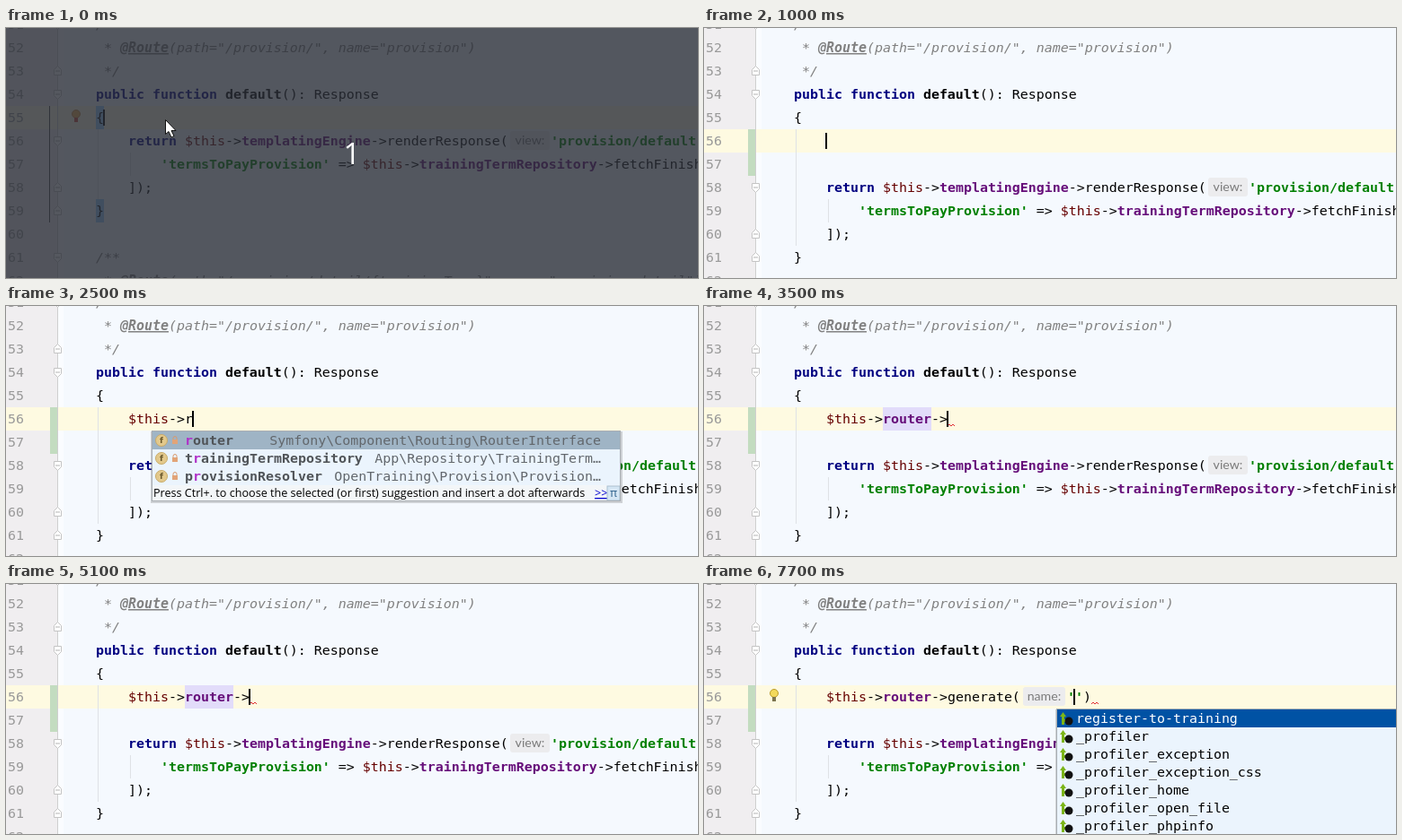
An HTML page for the animation above (8000 ms loop, 770 px wide and 279 px high).

```html
<!DOCTYPE html>
<html lang="en">
<head>
<meta charset="utf-8">
<title>Code completion</title>
<style>
html, body { margin: 0; width: 100%; height: 100%; overflow: hidden; background: #f5f9fe; }
svg { display: block; }
text { font: 14.95px "DejaVu Sans Mono", monospace; white-space: pre; }
.c, .a { fill: #808080; font-style: italic; }
.a, .k, .m, .f, .s, .b { font-weight: bold; }
.a { text-decoration: underline; }
.k { fill: #000080; }
.f { fill: #660e7a; }
.s { fill: #008000; }
.v { fill: #660000; }
.num { fill: #999; }
.b, .n { fill: #505458; }
.type { fill: #62676c; }
.hit { fill: #b030c8; }
.white { fill: #fff; }
.hint { font: 14.2px Lato, sans-serif; fill: #7a7a7a; }
.tip { font: 12.6px "Open Sans", sans-serif; }
.link { fill: #0000d0; text-decoration: underline; }
.tiny { font: bold 9px "DejaVu Sans", sans-serif; fill: #6b5a2e; }
.count { font: 33px "Open Sans", sans-serif; fill: #fff; }
</style>
</head>
<body>
<svg id="stage" width="770" height="279" viewBox="0 0 770 279"></svg>
<script>
const LOOP = 8000, COL = 9, ROW = 26, CODE = 136, CALL = 352;
const svg = document.getElementById('stage');

const rowTop = line => 9 + ROW * (line - 52);
const esc = s => String(s).replace(/&/g, '&amp;').replace(/</g, '&lt;');
const rect = (x, y, w, h, fill, more = '') =>
  `<rect x="${x}" y="${y}" width="${w}" height="${h}" fill="${fill}" ${more}/>`;
const path = (d, fill, more = '') => `<path d="${d}" fill="${fill}" ${more}/>`;
const text = (x, y, s, cls = '', more = '') =>
  `<text x="${x}" y="${y}" class="${cls}" ${more}>${esc(s)}</text>`;

// parts alternate between class and text
function code(x, y, parts) {
  let out = '';
  for (let i = 0; i < parts.length; i += 2)
    if (parts[i + 1]) out += `<tspan class="${parts[i]}">${esc(parts[i + 1])}</tspan>`;
  return `<text x="${x}" y="${y}">${out}</text>`;
}

const hint = (x, y, w, label) => rect(x, y + 2, w, 21, '#ececee', 'rx="3"') +
  text(x + w / 2, y + 17, label, 'hint', 'text-anchor="middle"');

const listing = [
  { col: 4, parts: ['c', '/**'], fold: 1 },
  { col: 4, parts: ['c', ' * ', 'a', '@Route', 'c', '(path="/provision/", name="provision")'] },
  { col: 4, parts: ['c', ' */'], fold: -1 },
  { col: 4, parts: ['k', 'public function ', 'm', 'default', '', '(): Response'], fold: 1 },
  { col: 4, parts: ['', '{'] },
  { col: 8, parts: ['k', 'return ', 'v', '$this', '', '->', 'f', 'templatingEngine', '', '->renderResponse('],
    fold: 1, view: true },
  { col: 12, parts: ['s', "'termsToPayProvision'", '', ' => ', 'v', '$this', '', '->',
    'f', 'trainingTermRepository', '', '->fetchFinished(),'] },
  { col: 8, parts: ['', ']);'], fold: -1 },
  { col: 4, parts: ['', '}'], fold: -1 },
  { col: 4, parts: [] },
  { col: 4, parts: ['c', '/**'], fold: 1 },
  { col: 4, parts: ['c', ' * ', 'a', '@Route', 'c', '(path="/provision/detail/{trainingTerm}", name="provision-detail")'] }
];

function foldIcon(y, dir) {
  const d = dir > 0 ? `M53.5 ${y - 4.5}h8v6l-4 4l-4 -4z` : `M53.5 ${y + 4.5}h8v-6l-4 -4l-4 4z`;
  return path(d, '#fff', 'stroke="#c4c4c4"') + rect(55, y - .5, 5, 1, '#b4b4b4');
}

const vars = [
  ['this', 'OpenTraining\\Provision\\Controller\\ProvisionControll…'],
  ['http_response_header', 'array'], ['GLOBALS', 'array'], ['_COOKIE', 'array'],
  ['_ENV', 'array'], ['_FILES', 'array'], ['_GET', 'array']
];
const fields = [
  ['router', 'Symfony\\Component\\Routing\\RouterInterface'],
  ['trainingTermRepository', 'App\\Repository\\TrainingTerm…'],
  ['provisionResolver', 'OpenTraining\\Provision\\Provision…']
];
const members = [...fields, ['templatingEngine', 'EngineInterface'], ['default', 'Response'],
  ['detail', 'Response'], ['pay', 'Response']];
const methods = [
  ['generate(name: string, [parameters: arra…', 'string'], ['getRouteCollection()', 'RouteCollection'],
  ['match(pathinfo: string)', 'array'], ['getContext()', 'RequestContext'],
  ['setContext(context: RequestContext)', 'void']
];
const routes = ['register-to-training', '_profiler', '_profiler_exception', '_profiler_exception_css',
  '_profiler_home', '_profiler_open_file', '_profiler_phpinfo'].map(n => [n, '']);

const badge = (x, y, ch) => `<circle cx="${x}" cy="${y}" r="6.5" fill="#e3c98c" stroke="#c9ab68"/>` +
  text(x, y + 3, ch, 'tiny', 'text-anchor="middle"');
const lock = (x, y) => path(`M${x - 2} ${y}v-2.5a2 2 0 0 1 4 0v2.5`, 'none', 'stroke="#d99a6c"') +
  rect(x - 3, y - 1, 6, 5, '#e2a478');
const routeIcon = (x, y) => path(`M${x + 3} ${y + 7}v-9h-2l3.5 -5l3.5 5h-2v3h4v3h-4v3z`, '#7cb518') +
  `<circle cx="${x + 11}" cy="${y + 3}" r="4.5" fill="#111"/>`;

const kinds = {
  vars: { ch: '$', cls: 'n', pad: 21, end: 8 },
  fields: { ch: 'f', cls: 'b', pad: 37, end: 22, locked: true },
  methods: { ch: 'm', cls: 'b', pad: 37, end: 22, locked: true },
  routes: { cls: '', pad: 22, end: 8, sel: '#0052a4' }
};

function popup({ kind, x, right, rows, find = '' }) {
  const k = kinds[kind], tip = !k.sel, w = right - x, base = 140 + 20 * rows.length;
  const h = base - 139 + (tip ? 18 : 2);
  let out = rect(x - 1, 140, w + 3, h + 1, '#000', 'opacity=".16"') +
    rect(x, 139, w, h, '#ebf4fd') + rect(x + 1, 140, w - 2, 20, k.sel || '#9fb4c5');
  rows.forEach(([name, type], i) => {
    const y = 150 + 20 * i, at = find ? name.indexOf(find) : -1;
    const cls = k.sel && !i ? 'white' : k.cls;
    out += k.sel ? routeIcon(x + 3, y) : badge(x + 11, y, k.ch);
    if (k.locked) out += lock(x + 26, y);
    out += code(x + k.pad, y + 5, at < 0 ? [cls, name] :
      [cls, name.slice(0, at), cls + ' hit', find, cls, name.slice(at + find.length)]);
    if (type) out += text(right - k.end, y + 5, type, 'type', 'text-anchor="end"');
  });
  if (tip) {
    out += rect(x + 1, base, w - 2, 17, '#f3f6f8') + text(x + 2, base + 13,
      'Press Ctrl+. to choose the selected (or first) suggestion and insert a dot afterwards', 'tip') +
      text(x + 493, base + 13, '>>', 'tip link');
    if (k.locked) out += rect(right - 15, base + 1, 14, 16, '#d5e6f4', 'stroke="#a9c0d2"') +
      text(right - 8, base + 13, 'π', 'tip', 'text-anchor="middle" fill="#2c5f8a"');
  }
  return out + rect(x + .5, 139.5, w - 1, h - 1, 'none', 'stroke="#a9aeb3"');
}

const varPop = (right, n, find) => ({ kind: 'vars', x: 124, right, rows: vars.slice(0, n), find });
const fieldPop = (right, rows, find) => ({ kind: 'fields', x: 162, right, rows, find });

// each step changes part of the editor state at a given time
const steps = [
  [0, { dark: 1, added: 0, mark: 0, line: 55, typed: '', tail: '', caret: 1, braces: 1, mouse: 1, bulb: 55 }],
  [200, { dark: 0 }],
  [500, { added: 1, line: 56, braces: 0, mouse: 0, bulb: 0 }],
  [600, { mark: 1 }],
  [700, { added: 2, mark: 2, line: 57 }],
  [1000, { line: 56 }],
  [1400, { typed: '$' }],
  [1500, { pop: varPop(696, 7) }],
  [1700, { typed: '$t', pop: varPop(682, 2, 't') }],
  [1800, { typed: '$th', pop: varPop(682, 1, 'th') }],
  [1900, { typed: '$thi', pop: varPop(682, 1, 'thi') }],
  [2000, { typed: '$this', pop: varPop(682, 1, 'this') }],
  [2100, { typed: '$this-', pop: null }],
  [2200, { typed: '$this->', pop: fieldPop(696, members) }],
  [2500, { typed: '$this->r', pop: fieldPop(684, fields, 'r') }],
  [2600, { typed: '$this->ro', pop: fieldPop(694, [fields[0], fields[2]], 'ro') }],
  [2800, { typed: '$this->router', pop: null }],
  [3200, { typed: '$this->router-', usage: 1, wavy: 1 }],
  [3500, { typed: '$this->router->' }],
  [3600, { pop: { kind: 'methods', x: 247, right: 769, rows: methods } }],
  [4300, { caret: 0 }],
  [4700, { caret: 1 }],
  [5100, { pop: null }],
  [5200, { typed: '$this->router->generate(', tail: ')', wavy: 0 }],
  [5500, { usage: 0, wavy: 1 }],
  [5600, { parens: 1 }],
  [5900, { tail: "'')", parens: 0 }],
  [6200, { named: 1 }],
  [7300, { caret: 0, bulb: 56, pop: { kind: 'routes', x: 392, right: 790, rows: routes } }],
  [7700, { caret: 1 }]
];
let last = {};
const states = steps.map(([, change]) => (last = { ...last, ...change }));

function typedLine(s) {
  const y = rowTop(56), tailX = CODE + COL * s.typed.length + (s.named ? 52 : 0);
  const [, v, arrow, name, rest] = s.typed.match(/^(\$\w*)(->|-)?(\w*)(.*)$/) || [];
  let out = '';
  if (s.usage) out += rect(199, y, 54, ROW, '#e2dcfa');
  if (s.parens) out += rect(CALL - COL, y, 2 * COL, ROW, '#99ccff');
  if (v) out += code(CODE, y + 18, ['v', v, '', arrow, name === 'router' ? 'f' : '', name, '', rest]);
  if (s.named) out += hint(CALL + 3, y, 47, 'name:');
  if (s.tail) out += code(tailX, y + 18, ['s', s.tail.slice(0, -1), '', ')']);
  if (s.wavy) out += path(`M${tailX + COL * s.tail.length} ${y + 21}l2 -2l2 2l2 -2l2 2`, 'none', 'stroke="#e03030"');
  return out;
}

function caretX(s) {
  if (s.line === 55) return 108;
  if (s.line === 57) return CODE - 1;
  return CODE - 1 + COL * s.typed.length + (s.named ? 51 : 0) + (s.tail.length > 1 ? COL : 0);
}

function bulb(line) {
  const y = rowTop(line) + 9, hot = line === 55;
  return `<circle cx="78" cy="${y}" r="4.5" fill="${hot ? '#f0b050' : '#f2d95c'}" stroke="${hot ? '#c98a4a' : '#b99b2c'}"/>` +
    rect(76, y + 4, 4, 5, hot ? '#d04a3c' : '#7d7550');
}

function draw(s) {
  const lineTop = rowTop(s.line), shift = s.added;
  let out = rect(0, 0, 770, 279, '#f5f9fe') + rect(0, 0, 57, 279, '#f0eef0') +
    rect(58, 0, 6, 279, '#fafcff') + rect(0, lineTop, 770, ROW, '#fefae1') +
    rect(49, 113, 8, ROW * s.mark, '#c3dcc0') + rect(57, 0, 1, 279, '#cfcfcf');
  if (s.braces) out += rect(100, 87, COL, ROW, '#99ccff') + rect(100, 191, COL, ROW, '#99ccff') +
    rect(48, 87, 1, 130, '#444');
  out += rect(102, 113, 1, rowTop(59 + shift) - 113, '#dfe2e6') +
    rect(138, rowTop(57 + shift), 1, ROW, '#dfe2e6');
  for (let n = 51; n < 63; n++) out += text(2, rowTop(n) + 18, n, 'num');
  listing.forEach((l, i) => {
    const y = rowTop(51 + i + (i > 4 ? shift : 0));
    out += code(64 + COL * l.col, y + 18, l.parts);
    if (l.fold) out += foldIcon(y + 13, l.fold);
    if (l.view) out += hint(561, y, 44, 'view:') + code(606, y + 18, ['s', "'provision/default.html.twig'", '', ', [']);
  });
  out += typedLine(s);
  if (s.caret) out += rect(caretX(s), lineTop + 4, 2, 18, '#000');
  if (s.bulb) out += bulb(s.bulb);
  if (s.pop) out += popup(s.pop);
  if (s.dark) out += rect(0, 0, 770, 279, '#2b2f38', 'opacity=".8"') +
    text(385, 152, '1', 'count', 'text-anchor="middle"');
  if (s.mouse) out += path('M177.5 102.5v16l3.5 -3l3 6.5l3 -1.5l-3 -6h5z', '#fff', 'stroke="#111"');
  svg.innerHTML = out;
}

let shown = -1;
function tick(now) {
  const t = now % LOOP;
  let i = steps.length - 1;
  while (i > 0 && steps[i][0] > t) i--;
  if (i !== shown) draw(states[shown = i]);
  requestAnimationFrame(tick);
}
tick(performance.now());
</script>
</body>
</html>
```
